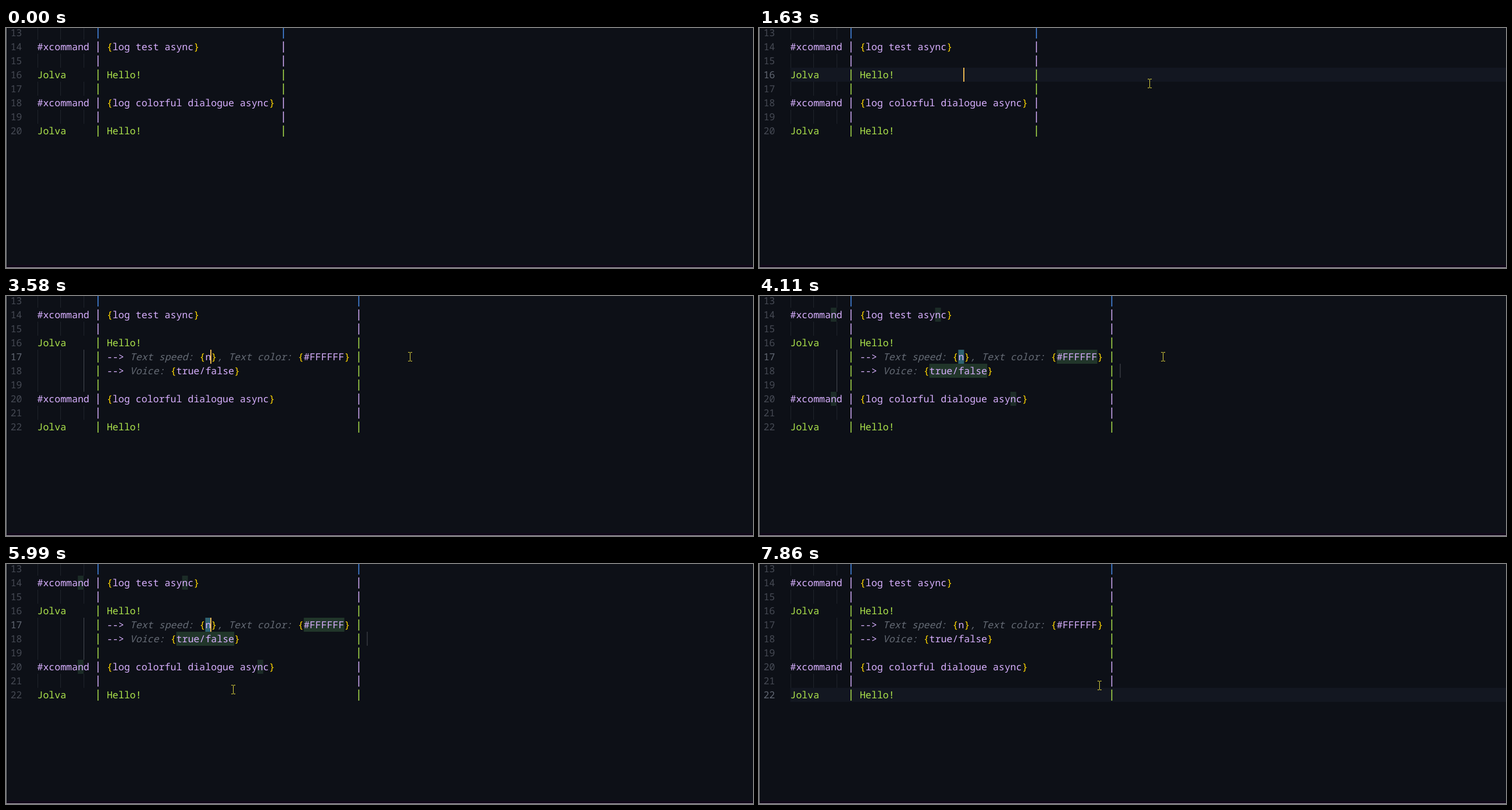
An HTML page with a canvas that plays this animation: 1280x411 px, repeating every 8000 ms.

```html
<!DOCTYPE html>
<html lang="en">
<head>
<meta charset="utf-8">
<title>Dialogue script editor</title>
<style>
  html, body { margin: 0; width: 100%; height: 100%; overflow: hidden; background: #0d1017; }
  canvas { display: block; }
</style>
</head>
<body>
<canvas id="stage" width="1280" height="411"></canvas>
<script>
const ctx = document.getElementById('stage').getContext('2d');
const LOOP = 8000, CHAR = 9.93, LEFT = 53.5, LINE = 24, FIRST = 13;
const FONT = '500 16.55px "Noto Sans Mono", "DejaVu Sans Mono", monospace';
const GREEN = '#aee54c', PURPLE = '#d8b0ff', BLUE = '#4a8ff0', GOLD = '#ffd700', GREY = '#656b75';
const CLICK_1 = 1190, INSERT = 3580, CLICK_2 = 6330;

// Each line: colour, speaker or command, content.
const command = text => [PURPLE, '#xcommand', text];
const hello = [GREEN, 'Jolva', 'Hello!'];
const gap = color => [color, '', ''];
const head = [gap(BLUE), command('{log test async}'), gap(PURPLE), hello];
const tail = [gap(GREEN), command('{log colorful dialogue async}'), gap(PURPLE), hello];
const notes = ['--> Text speed: {n}, Text color: {#FFFFFF}', '--> Voice: {true/false}'];
const before = [...head, ...tail];
const after = [...head, ...notes.map(note => [GREEN, '', note]), ...tail];

// Editor states in order; the last one begun applies.
const states = [
  { from: 0, lines: before },
  { from: CLICK_1, lines: before, active: 16, caret: 30 },
  { from: INSERT, lines: after, active: 17, caret: 30, snippet: true },
  { from: CLICK_2, lines: after, active: 22, caret: 31 }
];

// Pointer moves, each starting where the last one ended.
const origin = { x: 808, y: 190 };
const moves = [
  { from: 500, to: 1130, x: 353, y: 74 },
  { from: 1320, to: 1630, x: 669, y: 95 },
  { from: 1630, to: 1850, x: 692, y: 104 },
  { from: 5300, to: 6130, x: 364, y: 228 },
  { from: 6610, to: 6860, x: 583, y: 208 }
];

const colX = col => LEFT + col * CHAR;
const lineY = number => (number - FIRST) * LINE - 4;
const ease = k => k * k * (3 - 2 * k);

function rect(x, y, w, h, color) {
  ctx.fillStyle = color;
  ctx.fillRect(x, y, w, h);
}

function text(str, x, y, color, italic = false) {
  ctx.font = (italic ? 'italic ' : '') + FONT;
  ctx.fillStyle = color;
  ctx.fillText(str, x, y + 18);
}

function mark(col, count, number, color) {
  rect(colX(col), lineY(number), count * CHAR, LINE, color);
}

function drawContent(str, y, color) {
  const note = str.startsWith('-->');
  let col = 12, inside = false;
  for (const part of str.split(/(-->|[{}])/)) {
    const brace = part === '{' || part === '}';
    if (brace) inside = part === '{';
    const label = note && !inside && !brace && part !== '-->';
    text(part, colX(col), y, brace ? GOLD : label ? GREY : note ? PURPLE : color, label);
    col += part.length;
  }
}

// Tints the placeholders, and each "n" that matches the selected one.
function drawSnippetMarks(lines) {
  lines.forEach(([, name, content], i) => {
    const number = FIRST + i;
    if (name.startsWith('#')) {
      mark(name.indexOf('n'), 1, number, '#1c2c27');
      mark(12 + content.indexOf('n'), 1, number, '#1c2c27');
    } else if (!name) {
      for (const field of content.matchAll(/{(.+?)}/g)) {
        const color = field[1] === 'n' ? '#2f6270' : '#21362a';
        mark(13 + field.index, field[1].length, number, color);
      }
    }
  });
  rect(618.5, lineY(18), 1, LINE, '#4a4d54');
}

function drawLine([color, name, content], number, { active, snippet, lines }) {
  const y = lineY(number);
  text(number, 7.7, y, number === active ? '#626874' : '#464a54');
  if (!name) {
    for (const col of [0, 4, 8]) {
      const lit = snippet && col === 8 && number > 16 && number < 20;
      rect(Math.round(colX(col)), y, 1, LINE, lit ? '#454a53' : '#20242c');
    }
  }
  text(name, LEFT, y, color);
  drawContent(content, y, color);
  for (const col of [10, lines === after ? 55 : 42]) {
    rect(colX(col) + 4.1, y + 3, 1.5, 19, color);
  }
}

function pointerAt(t) {
  let { x, y } = origin;
  for (const move of moves) {
    const k = ease(Math.min(1, Math.max(0, (t - move.from) / (move.to - move.from))));
    x += (move.x - x) * k;
    y += (move.y - y) * k ** 1.4;
  }
  return [Math.round(x), Math.round(y)];
}

function drawPointer(t) {
  const [x, y] = pointerAt(t);
  if ([CLICK_1, CLICK_2].some(click => t >= click - 60 && t < click + 130)) {
    ctx.fillStyle = 'rgba(255, 240, 20, .53)';
    ctx.beginPath();
    ctx.arc(x, y, 12, 0, 7);
    ctx.fill();
  }
  const color = '#d9cf3c';
  rect(x, y - 7, 1, 14, color);
  for (const end of [-8, 7]) {
    rect(x - 3, y + end, 3, 1, color);
    rect(x + 1, y + end, 3, 1, color);
  }
}

function draw(t) {
  const state = states.findLast(s => t >= s.from);
  const { lines, active, caret, snippet } = state;

  rect(0, 0, 1280, 411, '#0d1017');
  if (active && !snippet) rect(LEFT, lineY(active), 1280, LINE, '#131721');
  if (snippet && t >= INSERT + 70) drawSnippetMarks(lines);
  lines.forEach((line, i) => drawLine(line, FIRST + i, state));
  if (caret && (t - state.from) % 990 < 520) {
    rect(Math.round(colX(caret)) - 1, lineY(active), 2, LINE, '#e6b450');
  }
  if (t >= 500) drawPointer(t);

  rect(0, 406, 1280, 4, '#13071b');
  rect(0, 410, 1280, 1, '#b8b6bc');
  rect(0, 0, 1, 411, '#85878b');
}

ctx.textRendering = 'geometricPrecision';
const start = performance.now();
function tick() {
  draw((performance.now() - start) % LOOP);
  requestAnimationFrame(tick);
}
tick();
</script>
</body>
</html>
```
